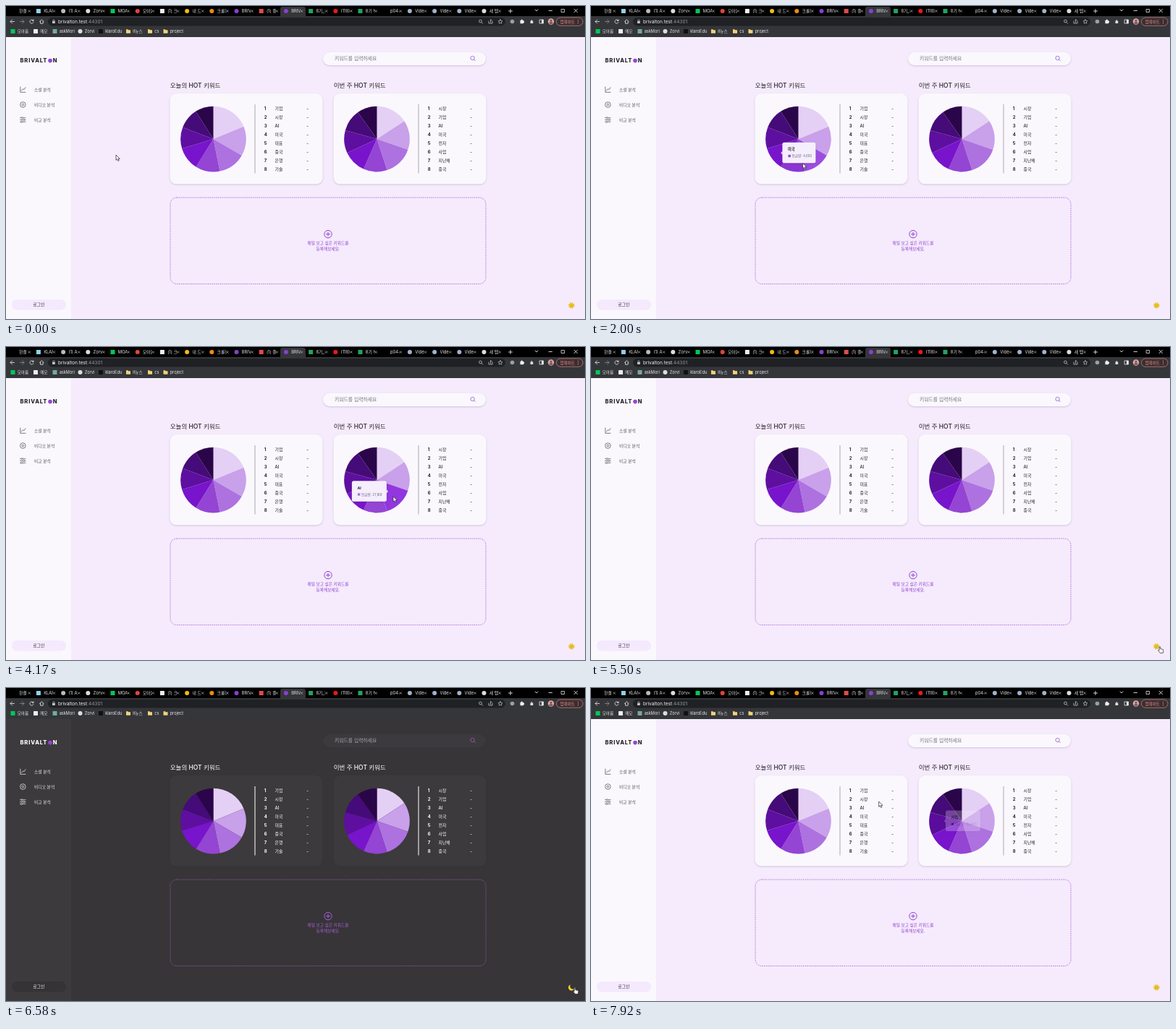
Animation, 800 px wide and 433 px high, one loop 8 s. Source, as an HTML page:

```html
<!DOCTYPE html>
<html lang="ko">
<head>
<meta charset="utf-8">
<title>Keyword dashboard</title>
<style>
  html, body { margin: 0; width: 100%; height: 100%; overflow: hidden; background: #000; }
  svg { display: block; }
  text { font-family: Inter, "Noto Sans CJK KR", "Noto Sans CJK", "Noto Sans", sans-serif; white-space: pre; }
  .line { fill: none; stroke-linecap: round; stroke-linejoin: round; }
  .shadow { filter: drop-shadow(0 1px 1.2px rgba(60, 40, 80, .2)); }
</style>
</head>
<body>
<svg id="stage" width="100%" height="100%" viewBox="0 0 800 433"></svg>
<script>
const LOOP = 8000;
const THEME = { // [light, dark]
  bg: ['#f5ebfc', '#373537'], panel: ['#faf8fd', '#3c3a3d'], ink: ['#252329', '#ffffff'],
  soft: ['#5c5961', '#e4e2e6'], hint: ['#77737d', '#a9a6ac'], rule: ['#aaa6af', '#ffffff'],
  accent: ['#8f43cf', '#a75ee0'], dash: ['#ae70df', '#8755ad'], button: ['#f4e9fd', '#353335']
};
const SHADES = ['#e4d0f5', '#c9a0ea', '#ad72df', '#9445d3', '#7814cc', '#5e0fa0', '#450b78', '#2b0549'];
const HOVERS = ['#cb95fb', '#b264f5', '#9236e0', '#7c1fd2', '#6100b8', '#4a008c', '#330066', '#1c0038'];
const PIES = [
  { x: 286.5, title: '오늘의 HOT 키워드', stops: [0, 67.5, 120, 168.5, 212, 253, 291, 327.5, 360],
    words: ['기업', '시장', 'AI', '미국', '대표', '중국', '은행', '기술'],
    counts: ['6,914', '5,380', '4,975', '4,692', '4,207', '3,896', '3,741', '3,318'] },
  { x: 512.5, title: '이번 주 HOT 키워드', stops: [0, 56.7, 109, 162, 204, 245, 285.5, 324.5, 360],
    words: ['시장', '기업', 'AI', '미국', '전자', '사업', '지난해', '중국'],
    counts: ['22,274', '21,530', '21,168', '17,204', '16,385', '15,940', '15,122', '14,067'] }
];
const PIE_Y = 184, PIE_R = 45.3;
const POINTER = [ // time, x, y
  [0, 152, 206], [650, 152, 206], [1100, 255, 168], [1400, 298, 162], [1650, 314, 190],
  [1830, 304, 213], [1960, 292.6, 217.5], [2350, 293, 217], [2650, 330, 190], [3000, 485, 172],
  [3180, 534, 166], [3500, 534, 166], [3950, 535, 206.5], [4350, 535, 207], [4650, 590, 260],
  [5250, 786, 414], [7150, 786, 414], [7580, 562, 188], [7790, 466, 180], [7920, 398, 157], [8000, 372, 156]
];

const clamp = v => Math.max(0, Math.min(1, v));
const lerp = (a, b, k) => a + (b - a) * k;
const easeOut = k => 1 - (1 - clamp(k)) ** 4;
const mix = (from, to, k) => `color-mix(in srgb, ${to} ${(k * 100).toFixed(1)}%, ${from})`;
const polar = (pie, deg, r) => {
  const a = deg * Math.PI / 180;
  return [pie.x + r * Math.sin(a), PIE_Y - r * Math.cos(a)];
};

const text = (x, y, size, fill, str, extra = '') =>
  `<text x="${x}" y="${y}" font-size="${size}" fill="${fill}" ${extra}>${str}</text>`;
const rect = (x, y, w, h, r, fill, extra = '') =>
  `<rect x="${x}" y="${y}" width="${w}" height="${h}" rx="${r}" fill="${fill}" ${extra}/>`;
const dot = (x, y, r, fill, extra = '') => `<circle cx="${x}" cy="${y}" r="${r}" fill="${fill}" ${extra}/>`;
const line = (d, stroke, width = .8) => `<path class="line" d="${d}" stroke="${stroke}" stroke-width="${width}"/>`;
const ring = (x, y, r, stroke, width = .8) => dot(x, y, r, 'none', `stroke="${stroke}" stroke-width="${width}"`);
const badge = (x, y, kind, fill) => kind === 's' ? rect(x - 3, y - 3, 6, 6, .6, fill) : dot(x, y, 3, fill);
const BOLD = 'font-weight="700"', MID = 'text-anchor="middle"';

function browserChrome() {
  const tabs = [
    ['한결', 'c', '#000'], ['KLARO', 's', '#8fd0ee'], ['(1) API', 'c', '#bbb'], ['Zorvi -', 'c', '#ddd'],
    ['MOABO', 's', '#03c75a'], ['모아봄', 'c', '#e0453a'], ['(1) 크롤', 's', '#eee'], ['내 드라', 'c', '#f4b916'],
    ['크롤링', 'c', '#f08a13'], ['BRIVAL', 'c', '#8a3fd0'], ['(1) 캘린', 's', '#e04b4b'], ['BRIVAL', 'c', '#8a3fd0'],
    ['8기_특', 's', '#1fa463'], ["(118) '7", 'c', '#f01818'], ['8기 부', 's', '#1fa463'], ['p04-dat', 'c', '#000'],
    ['Video t', 'c', '#9db4d0'], ['Video t', 'c', '#9db4d0'], ['Video t', 'c', '#9db4d0'], ['새 탭', 'c', '#ddd']
  ];
  const marks = [
    [9.5, '모아봄', 's', '#03c75a'], [41, '메모', 's', '#eee'], [67.5, 'askMori', 's', '#74aa9c'],
    [102.5, 'Zorvi', 'c', '#ddd'], [131, 'klaroEdu', 's', '#111'], [169, 'it뉴스'], [199, 'cs'], [220.5, 'project']
  ];
  const grey = '#d5d7da';
  let s = rect(0, 0, 800, 15, 0, '#000') + rect(0, 14, 800, 29, 0, '#35363a') + rect(379, 1, 35, 16, 3, '#35363a');
  tabs.forEach(([name, kind, color], i) => {
    const x = 18 + 34.2 * i;
    s += badge(x - 7.3, 7, kind, color);
    s += `<svg x="${x}" y="0" width="12.5" height="14">${text(0, 9.2, 5.8, '#e4e5e8', name)}</svg>`;
    s += line(`M${x + 13} 5.8l2.6 2.6m0-2.6l-2.6 2.6`, grey, .6);
  });
  s += line('M694.5 7h5m-2.5-2.5v5M731 5l2 2 2-2M750 6.5h4.5M785 4.2l4.5 4.5m0-4.5l-4.5 4.5', '#fff', .8);
  s += line('M767.5 4.5h4v4h-4z', '#fff', .7);

  s += line('M11.5 21.5H6m2.5-2.5L6 21.5 8.500 24M46.500 21.500l2.800-2.700 2.800 2.700M47.500 21v3.200h3.600v-3.200', grey, .9);
  s += line('M19.500 21.500H25m-2.500-2.500l2.500 2.500-2.500 2.500', '#85878a', .9);
  s += line('M37.800 20.200a2.600 2.600 0 1 0 .2 2.300M38 18.800v1.700h-1.700', grey, .9);
  s += rect(58, 16, 632, 11.500, 5.700, '#202124');
  s += rect(64, 20.800, 3.800, 3.200, .5, '#c3c5c8') + line('M64.800 20.800v-1a1.100 1.100 0 0 1 2.200 0v1', '#c3c5c8', .6);
  s += text(72, 23.700, 6.500, '#f1f1f2', 'brivalton.test<tspan fill="#93969a">:44301</tspan>');
  s += ring(655.500, 21, 1.900, grey, .7) + line('M657 22.500l1.700 1.700', grey, .7);
  s += line('M667 21v3h5v-3M669.500 22.500v-4l1.800 1.500', grey, .7);
  s += line('M683 18.500l.9 2 2.100.2-1.600 1.400.5 2.100-1.900-1.100-1.900 1.100.5-2.100-1.600-1.400 2.100-.2z', grey, .6);
  s += dot(699.500, 21.500, 2.800, '#9aa0a4');
  s += rect(710.500, 19.800, 4.600, 4.400, .5, '#eee') + dot(712.700, 19.500, 1, '#eee') + dot(715.300, 22, 1, '#eee');
  s += rect(724.500, 20.500, 3.800, 3.600, .5, '#ddd') + dot(726.300, 20.200, .9, '#ddd');
  s += line('M737.500 19h5v5h-5z', '#eee', .8) + rect(740, 19, 2.500, 5, 0, '#eee');
  s += dot(753, 21.500, 4.200, '#d9a9a4') + dot(753, 20.300, 1.500, '#7b4b51') + rect(750.600, 22.300, 4.800, 2.400, 1.200, '#7b4b51');
  s += rect(760.500, 16, 36.500, 11.300, 5.600, '#3a2e31', 'stroke="#d98680" stroke-width=".7"');
  s += text(765.500, 23.700, 5.500, '#f2958d', '업데이트');
  s += [19.300, 21.500, 23.700].map(y => dot(790.500, y, .6, '#f2958d')).join('');

  marks.forEach(([x, name, kind, color]) => {
    s += kind ? badge(x, 35, kind, color)
      : `<path d="M${x - 3} 32.300h2.300l.8.900h2.900v4.500h-6z" fill="#f3d27a"/>`;
    s += text(x + 6.200, 37, 5.600, '#e8e9eb', name);
  });
  return s;
}

function sidebar() {
  const soft = 'var(--soft)';
  let s = rect(0, 43, 90, 390, 0, 'var(--panel)');
  s += text(19.500, 78.300, 7.500, 'var(--ink)', 'BRIVALT', 'font-weight="800" letter-spacing=".85"');
  s += dot(61, 75.600, 2.800, '#9445d3') + text(64.800, 78.300, 7.500, 'var(--ink)', 'N', 'font-weight="800"');
  s += line('M19.800 112v7.300h7.200M21.500 117l1.900-2.300 1.500 1 2-3', soft, .8);
  s += ring(23.300, 136.500, 3.800, soft) + ring(23.300, 136.500, 1.400, soft);
  s += line('M19.500 154.700h1.500m2.600 0h3.500M19.500 157.500h4m2.500 0h1M19.500 160.300h1m2.500 0h4', soft, .8);
  s += ring(22.300, 154.700, 1.100, soft, .7) + ring(24.800, 157.500, 1.100, soft, .7) + ring(21.700, 160.300, 1.100, soft, .7);
  ['소셜 분석', '비디오 분석', '비교 분석'].forEach((name, i) => {
    s += text(39, 117.800 + i * 21, 5.800, soft, name, 'font-weight="500"');
  });
  return s + rect(8, 406, 75, 14.500, 7.250, 'var(--button)')
    + text(45.300, 415.300, 5.700, 'var(--ink)', '로그인', MID + ' font-weight="500"');
}

function pieCard(pie, p) {
  const left = pie.x - 60;
  let s = text(left + .3, 113.300, 8.500, 'var(--ink)', pie.title, 'font-weight="500"');
  s += rect(left, 121, 211, 125.300, 9, 'var(--panel)', 'class="shadow"');
  SHADES.forEach((shade, i) => {
    const [a, b] = [pie.stops[i], pie.stops[i + 1]];
    s += `<path id="slice${p * 8 + i}" fill="${shade}" d="M${pie.x} ${PIE_Y}L${polar(pie, a, PIE_R)}A${PIE_R} ${PIE_R} 0 0 1 ${polar(pie, b, PIE_R)}z"/>`;
    const y = 143.700 + 12 * i;
    s += text(left + 130.300, y, 6, 'var(--ink)', i + 1, BOLD);
    s += text(left + 145, y, 5.900, 'var(--ink)', pie.words[i], 'font-weight="500"');
    s += text(left + 188.700, y, 6, 'var(--ink)', '-', 'font-weight="500"');
  });
  return s + rect(left + 117, 136, 1, 95.500, 0, 'var(--rule)');
}

function mainArea() {
  const accent = 'var(--accent)';
  let s = rect(90, 43, 710, 390, 0, 'var(--bg)');
  s += rect(438, 64, 225, 18, 9, 'var(--panel)', 'class="shadow"');
  s += text(454, 75.400, 6.800, 'var(--hint)', '키워드를 입력하세요');
  s += ring(644.600, 72, 2.700, accent, .7) + line('M646.600 74l1.700 1.700', accent, .7);
  s += PIES.map(pieCard).join('');
  s += rect(227, 265, 436, 119.500, 9, 'none', 'stroke="var(--dash)" stroke-width=".9" stroke-dasharray="1.6 1.1"');
  s += ring(445, 315.600, 5.200, accent, 1) + line('M442.500 315.600h5m-2.500-2.500v5', accent, 1);
  s += text(445, 330, 5.700, accent, '매일 보고 싶은 키워드를', MID + ' font-weight="500"');
  s += text(445, 337.700, 5.700, accent, '등록해보세요.', MID + ' font-weight="500"');
  s += `<g id="sun">${dot(781.300, 414.300, 2.900, '#e6bd1c')}${dot(781.300, 414.300, 3.500, 'none', 'stroke="#e6bd1c" stroke-width="1.5" stroke-dasharray="1.600 1.149"')}</g>`;
  return s + '<path id="moon" fill="#f0d32c" d="M779.800 410.300a4.300 4.300 0 1 0 5.300 5.900a4.200 4.200 0 0 1-5.300-5.900z"/>';
}

const tooltip = `<g id="tip">${rect(0, 0, 46, 28.500, 2.500, '#f5eefc', 'id="tipBox" class="shadow"')}
  <path id="tipCaret" fill="#f5eefc"/>${text(7.500, 11.500, 5.200, '#2b2730', '', 'id="tipTitle" ' + BOLD)}
  ${rect(7.700, 16.600, 4, 4, 0, '#fff', 'id="tipSwatch" stroke="#fff" stroke-width=".5"')}
  ${text(13.200, 20.400, 4.600, '#6f6879', '', 'id="tipCount"')}</g>`;
const pointers = `<path id="arrow" fill="#fff" stroke="#222" stroke-width=".7" d="M0 0v7.300l1.700-1.500 1.200 2.600 1.300-.6-1.200-2.500h2.300z"/>
  <path id="hand" fill="#fff" stroke="#222" stroke-width=".7" stroke-linejoin="round" d="M-.8 1q.8-1.300 1.600 0v2.600l3.400.8q.9.300.7 1.500l-.6 3.400h-4l-2.600-3.400q.2-1.100 1.500-.3z"/>`;

document.getElementById('stage').innerHTML = mainArea() + sidebar() + browserChrome() + tooltip + pointers;
const $ = id => document.getElementById(id);
const show = (id, on) => $(id).setAttribute('visibility', on ? 'visible' : 'hidden');

function pointerAt(t) {
  const i = Math.max(1, POINTER.findIndex(p => p[0] > t));
  const [a, b] = [POINTER[i - 1], POINTER[i]];
  const k = (t - a[0]) / (b[0] - a[0]);
  return [lerp(a[1], b[1], k), lerp(a[2], b[2], k)];
}

// Slice under the pointer as pie * 8 + index, or -1.
function sliceUnder([x, y]) {
  const p = PIES.findIndex(pie => Math.hypot(x - pie.x, y - PIE_Y) < PIE_R);
  if (p < 0) return -1;
  const deg = (Math.atan2(x - PIES[p].x, PIE_Y - y) * 180 / Math.PI + 360) % 360;
  return p * 8 + PIES[p].stops.findIndex(stop => stop > deg) - 1;
}

function tipTarget(id) {
  const pie = PIES[id >> 3], i = id & 7;
  const [x, y] = polar(pie, (pie.stops[i] + pie.stops[i + 1]) / 2, PIE_R / 2);
  const w = 36 + 2 * pie.counts[i].length, right = x < pie.x;
  return { id, w, right, x: right ? x + 2.500 : x - 2.500 - w, y: y - 14.800, alpha: 1 };
}

function tipState(event, t) {
  const { from, to } = event, k = easeOut((t - event.t) / 400);
  return { ...to, x: lerp(from.x, to.x, k), y: lerp(from.y, to.y, k), w: lerp(from.w, to.w, k),
    alpha: lerp(from.alpha, to.alpha, clamp((t - event.t) / 200)) };
}

// Trace the pointer once to find every hover change.
const hidden = { ...tipTarget(0), alpha: 0 };
const events = [{ t: 0, id: -1, from: hidden, to: hidden }];
for (let t = 0; t < LOOP; t += 5) {
  const last = events[events.length - 1], id = sliceUnder(pointerAt(t));
  if (id === last.id) continue;
  const now = tipState(last, t);
  const to = id < 0 ? { ...now, alpha: 0 } : tipTarget(id);
  const from = now.id >> 3 === to.id >> 3 && now.alpha > 0 ? now : { ...to, alpha: 0 };
  events.push({ t, id, from, to });
}

function drawHover(t) {
  let n = events.length - 1;
  while (events[n].t > t) n--;
  const event = events[n], k = easeOut((t - event.t) / 400);
  const previous = n ? events[n - 1].id : -1;
  for (let id = 0; id < 16; id++) {
    const glow = id === event.id ? k : id === previous ? 1 - k : 0;
    $('slice' + id).style.fill = mix(SHADES[id & 7], HOVERS[id & 7], glow);
  }
  const tip = tipState(event, t), pie = PIES[tip.id >> 3], i = tip.id & 7;
  $('tip').setAttribute('transform', `translate(${tip.x} ${tip.y})`);
  $('tip').setAttribute('opacity', tip.alpha);
  $('tipBox').setAttribute('width', tip.w);
  $('tipCaret').setAttribute('d', tip.right ? 'M0 12l-2 2.500 2 2.500z' : `M${tip.w} 12l2 2.500-2 2.500z`);
  $('tipTitle').textContent = pie.words[i];
  $('tipCount').textContent = '언급량: ' + pie.counts[i];
  $('tipSwatch').setAttribute('fill', SHADES[i]);
}

function draw(t) {
  const dark = clamp((t - 5560) / 200) - clamp((t - 7000) / 200);
  for (const name in THEME) $('stage').style.setProperty('--' + name, mix(...THEME[name], dark));
  show('sun', dark < .5);
  show('moon', dark >= .5);
  drawHover(t);
  const [x, y] = pointerAt(t), onToggle = x > 774 && y > 404;
  show('arrow', !onToggle);
  show('hand', onToggle);
  $(onToggle ? 'hand' : 'arrow').setAttribute('transform', `translate(${x} ${y})`);
}

const start = performance.now();
function tick() {
  draw((performance.now() - start) % LOOP);
  requestAnimationFrame(tick);
}
tick();
</script>
</body>
</html>
```
